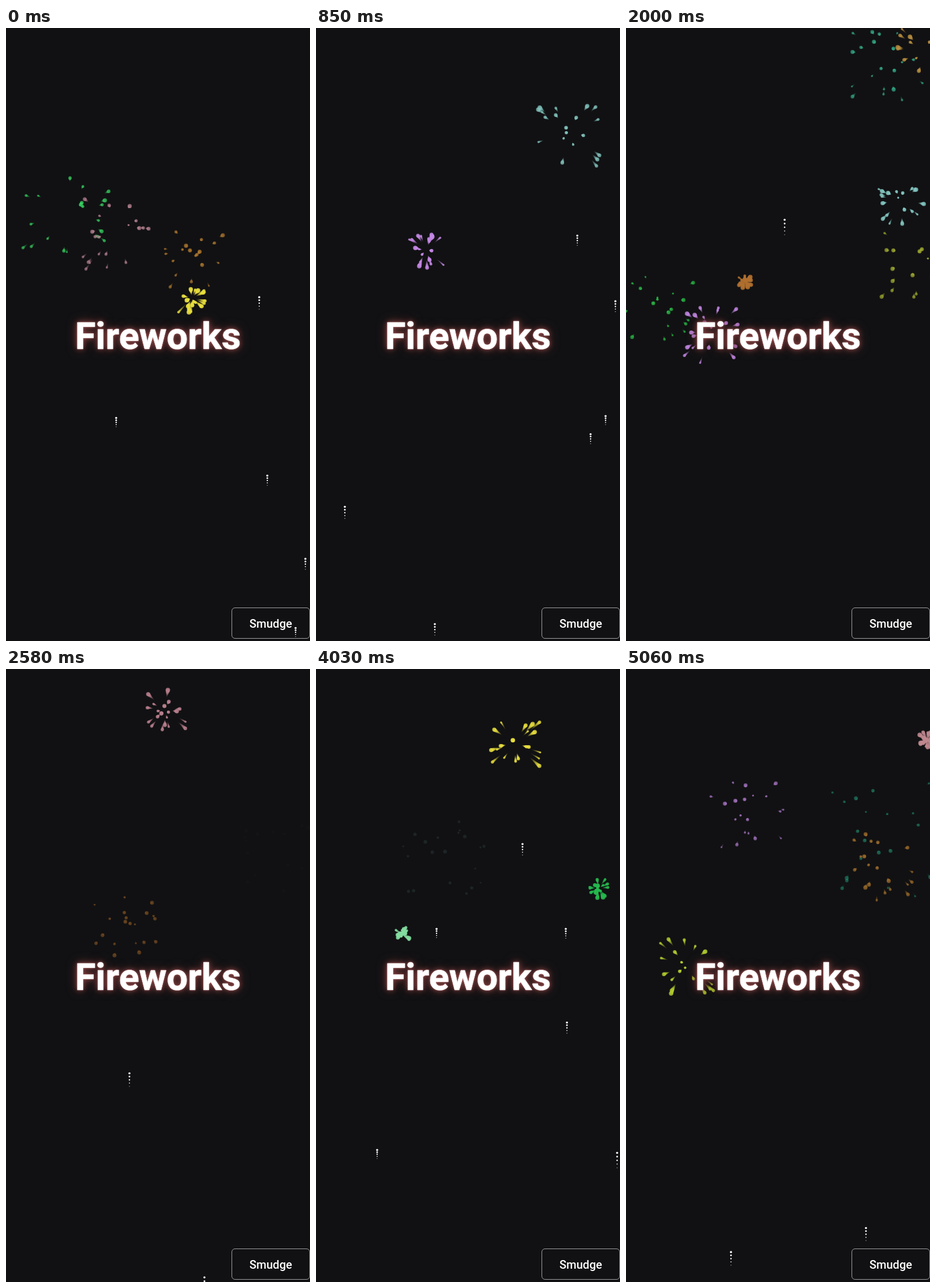
An HTML page with a canvas that plays this animation: 527 by 1062 pixels, repeating every 5.09 s.

```html
<!DOCTYPE html>
<html lang="en">
<head>
<meta charset="utf-8">
<title>Fireworks</title>
<style>
  html, body { margin: 0; width: 100%; height: 100%; overflow: hidden; background: #111113; }
  canvas { position: absolute; left: 0; top: 0; }
  h1, .button { position: absolute; margin: 0; color: #fff; text-align: center; font-family: Roboto, sans-serif; }
  h1 {
    left: 0; top: 502px; width: 527px; font-size: 65px; font-weight: 700; line-height: 65px;
    -webkit-text-stroke: .6px #fff;
    text-shadow: 0 0 3px #b87070, 0 0 10px #8a4444, 0 0 18px #6a3434;
  }
  .button {
    box-sizing: border-box; left: 391px; top: 1004px; width: 136px; height: 54px;
    border: 1px solid #a0a0a2; border-radius: 6px;
    font-size: 20px; font-weight: 500; line-height: 54px;
  }
</style>
</head>
<body>
<canvas id="sky" width="527" height="1062"></canvas>
<h1>Fireworks</h1>
<div class="button">Smudge</div>
<script>
const LOOP = 5090, LIFE = 890, SPARKS = 20, TAIL = 12, STEP = 8.6;
const ctx = document.getElementById('sky').getContext('2d');

// x, burst y, burst time (ms), climb speed (px/ms), spread (px), colour
const rockets = [
  [108, 328, -520, .5, 122, '#3ce068'],
  [195, 350, -500, .5, 104, '#c08a9a'],
  [325, 396, -490, .5, 82, '#b07a30'],
  [322, 468, -137, .5, 100, '#e8df3f'],
  [439, 185, 470, .6, 104, '#84c6c0'],
  [191, 385, 660, .441, 95, '#c488e4'],
  [453, 62, 1460, .489, 95, '#3abf99'],
  [519, 45, 1667, .525, 100, '#b88e40'],
  [502, 407, 1465, .432, 90, '#b0bd36'],
  [476, 300, 1701, .475, 90, '#84c6c0'],
  [50, 485, 1440, .585, 100, '#30d852'],
  [206, 440, 1921, .554, 75, '#b07030'],
  [147, 530, 1671, .7, 100, '#c488e4'],
  [275, 72, 2347, .752, 100, '#b87f8d'],
  [214, 295, 3200, .655, 100, '#84c2c0'],
  [344, 130, 3812, .7506, 130, '#e8df3f'],
  [358, 240, 4146, .55, 82, '#6850a8'],
  [490, 380, 3895, .66, 70, '#26b84e'],
  [150, 460, 3962, .49, 95, '#84dca0'],
  [209, 248, 4493, .438, 95, '#c488e4'],
  [433, 285, 4385, .467, 138, '#2cc096'],
  [435, 330, 4557, .537, 108, '#a8742e'],
  [522, 123, 4986, .749, 100, '#c08890'],
  [106, 515, 4771, .43, 112, '#b4cc30'],
  [416, 300, 6122, .63, 100, '#e8df3f'],
  [182, 300, 6137, .66, 100, '#c488e4']
];

function seeded(seed) {
  let s = seed * 7919 + 17;
  return () => {
    s = (s * 16807) % 2147483647;
    return s / 2147483647;
  };
}

const shows = rockets.map(([x, y, time, speed, spread, color], i) => {
  const rnd = seeded(i + 1);
  rnd(); rnd();
  const sparks = Array.from({ length: SPARKS }, () => ({
    dx: (rnd() * 2 - 1) * spread,
    dy: (rnd() * 2 - 1) * spread,
    r: 1.8 + rnd() * 2.4
  }));
  return { x, y, time, speed, color, sparks };
});

function dot(x, y, r) {
  ctx.beginPath();
  ctx.arc(x, y, r, 0, Math.PI * 2);
  ctx.fill();
}

function drawRocket(show, t) {
  const y = show.y + (show.time - t) * show.speed;
  if (y > 1070) return;
  ctx.globalAlpha = 1;
  ctx.fillStyle = '#fff';
  for (let i = 0; i < 5; i++) dot(show.x, y + i * STEP * show.speed, 1.8 - i * .3);
}

function drawBurst(show, age) {
  const fade = 1 - (age / LIFE) ** 2;
  const shrink = 1 - .2 * age / LIFE;
  ctx.fillStyle = show.color;
  for (const p of show.sparks) {
    for (let i = TAIL - 1; i >= 0; i--) {
      const a = age - i * STEP;
      if (a < 0) continue;
      // Drag slows the sparks; a light gravity pulls them down.
      const k = 1 - Math.exp(-a / 500);
      const body = 1 - i / TAIL;
      // Overlapping tail dots add up, so they fade faster than the head.
      ctx.globalAlpha = i ? fade ** 3 * (.2 + .5 * body) : fade * .85;
      dot(show.x + p.dx * k, show.y + p.dy * k + 2e-5 * a * a, p.r * shrink * body);
    }
  }
}

function draw(t) {
  ctx.clearRect(0, 0, 527, 1062);
  for (const show of shows) {
    const age = t - show.time;
    if (age < 0) drawRocket(show, t);
    else if (age < LIFE) drawBurst(show, age);
  }
}

const start = performance.now();
function frame() {
  draw((performance.now() - start) % LOOP);
  requestAnimationFrame(frame);
}
frame();
</script>
</body>
</html>
```
